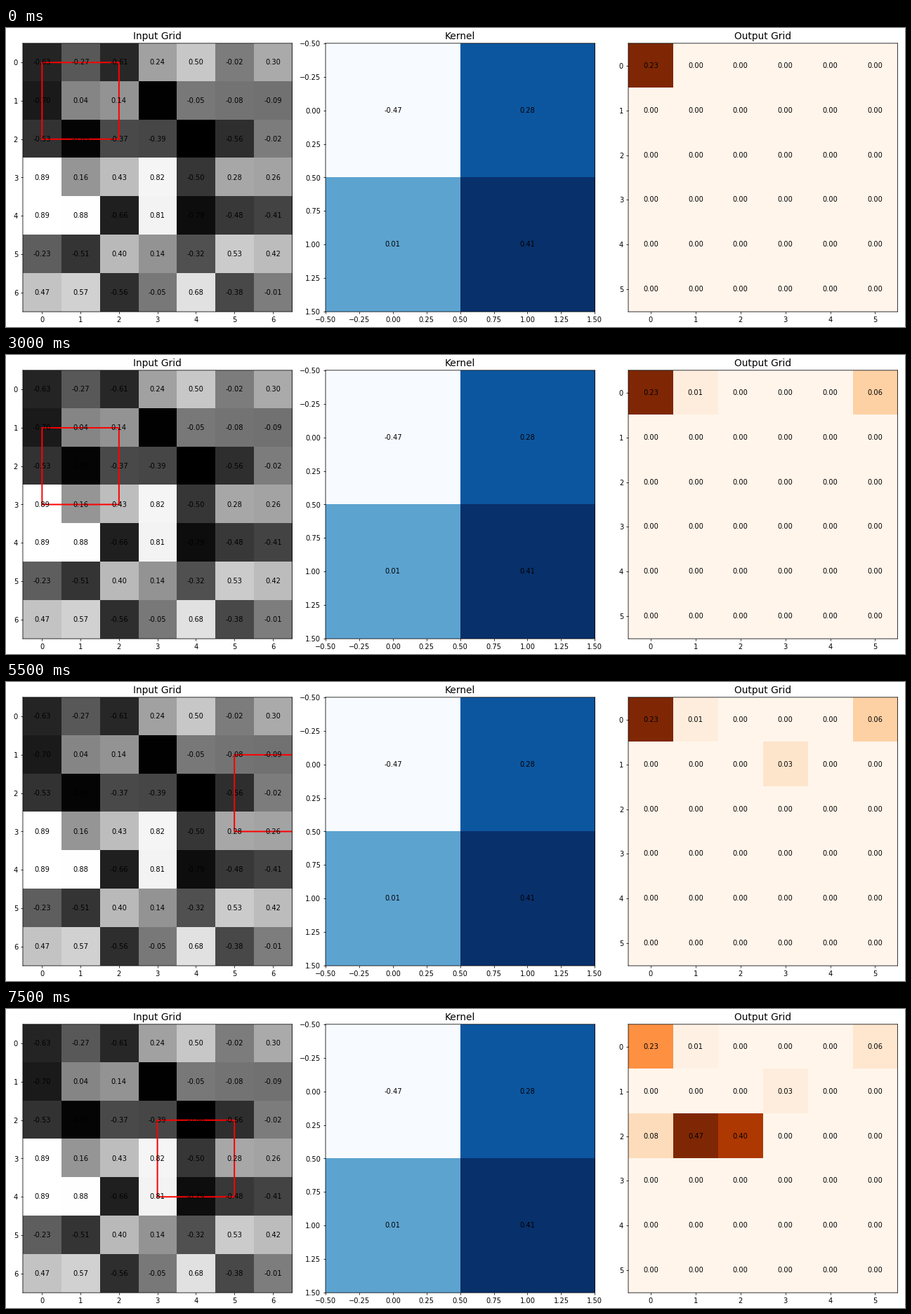
These frames come from a looping animation (1280x427 px, 8 s). A matplotlib script:

```python
import matplotlib.pyplot as plt
import numpy as np
from matplotlib.animation import FuncAnimation
from matplotlib.patches import Rectangle

WIDTH, HEIGHT = 1280, 427
DPI = WIDTH / 18
STEPS, INTERVAL = 16, 500

plt.rcParams["font.family"] = "DejaVu Sans"
plt.rcParams["path.snap"] = False

# The input values are the content on show; everything else follows from them.
grid = np.array([
    [-0.63, -0.27, -0.61, 0.24, 0.50, -0.02, 0.30],
    [-0.70, 0.04, 0.14, -0.87, -0.05, -0.08, -0.09],
    [-0.53, -0.85, -0.37, -0.39, -0.88, -0.56, -0.02],
    [0.89, 0.157, 0.43, 0.818, -0.50, 0.28, 0.26],
    [0.89, 0.88, -0.66, 0.81, -0.79, -0.48, -0.41],
    [-0.23, -0.51, 0.40, 0.14, -0.32, 0.53, 0.42],
    [0.47, 0.57, -0.56, -0.05, 0.68, -0.38, -0.01],
])
kernel = np.array([[-0.47, 0.28], [0.01, 0.41]])
K = len(kernel)
N = len(grid) - K + 1


def convolve(steps):
    """Rectified convolution with only the first `steps` cells filled in."""
    out = np.zeros((N, N))
    for k in range(steps):
        row, col = divmod(k, N)
        out[row, col] = max(0, np.sum(grid[row:row + K, col:col + K] * kernel))
    return out


def show_matrix(ax, title, data, cmap):
    image = ax.imshow(data, cmap=cmap)
    ax.set_title(title, fontsize=14)
    labels = [ax.text(col, row, f"{value:.2f}", ha="center", va="center")
              for (row, col), value in np.ndenumerate(data)]
    return image, labels


# The tiny margin keeps the pixel size from being truncated.
fig, (input_ax, kernel_ax, output_ax) = plt.subplots(
    1, 3, figsize=((WIDTH + 0.01) / DPI, (HEIGHT + 0.01) / DPI), dpi=DPI)
show_matrix(input_ax, "Input Grid", grid, "gray")
show_matrix(kernel_ax, "Kernel", kernel, "Blues")
output_image, output_labels = show_matrix(
    output_ax, "Output Grid", convolve(1), "Oranges")

window = Rectangle((0, 0), K, K, fill=False, edgecolor="red", linewidth=2)
input_ax.add_patch(window)
fig.tight_layout()


def update(step):
    row, col = divmod(step, N)
    window.set_xy((col, row))
    out = convolve(step + 1)
    output_image.set_data(out)
    output_image.set_clim(0, out.max())
    for label, value in zip(output_labels, out.flat):
        label.set_text(f"{value:.2f}")
    return [window, output_image, *output_labels]


anim = FuncAnimation(fig, update, frames=STEPS, interval=INTERVAL,
                     init_func=lambda: update(0), repeat=True, repeat_delay=0)
plt.show()
```
